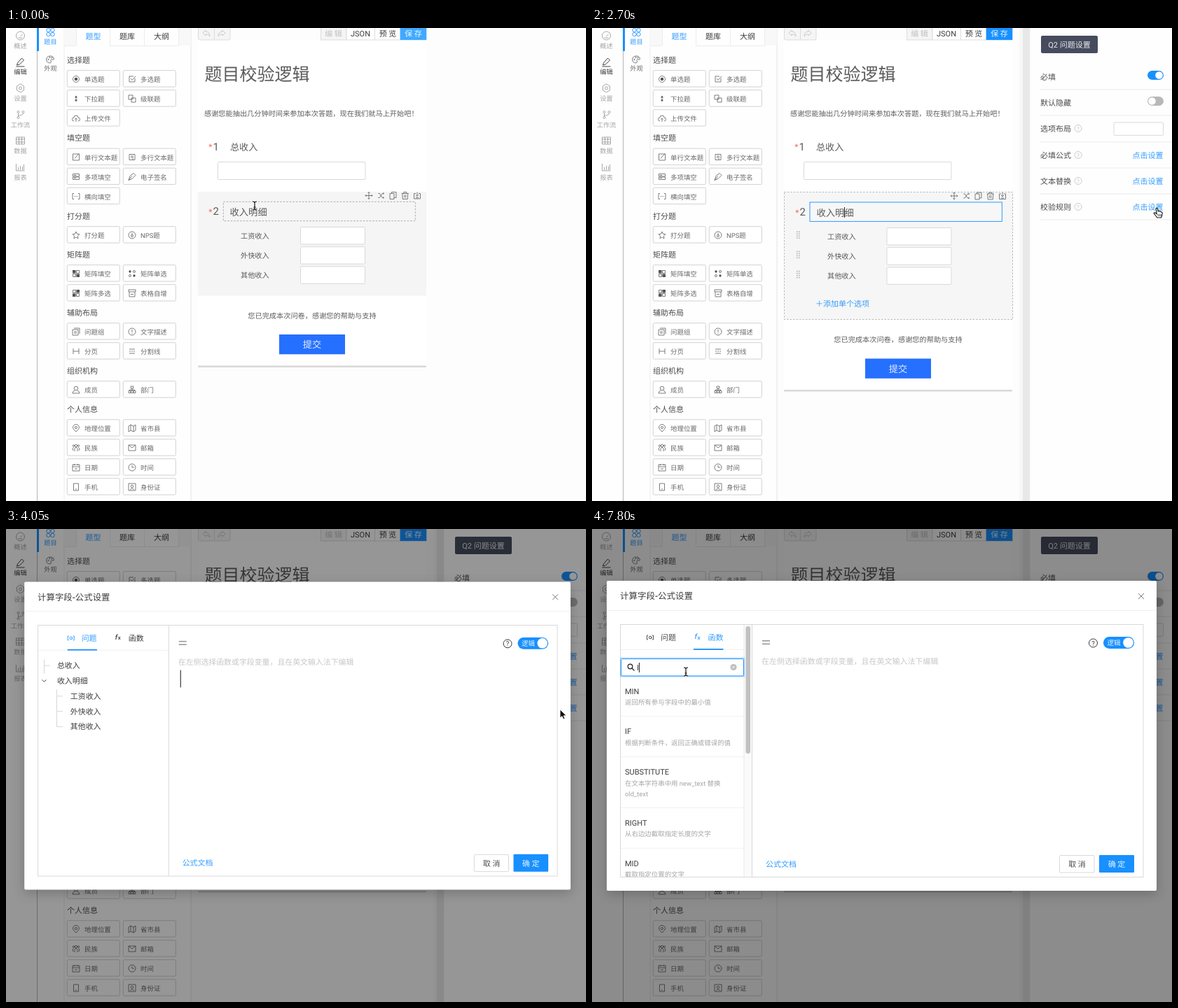
Write an HTML page that moves like this. It is 828 px wide and 676 px high and loops after 8 s.

```html
<!DOCTYPE html>
<html lang="zh-CN">
<head>
<meta charset="utf-8">
<title>题目校验逻辑</title>
<style>
html, body { margin: 0; width: 100%; height: 100%; overflow: hidden; background: #fff; }
svg { display: block; width: 828px; height: 676px; }
text { font-family: Roboto, "Noto Sans CJK SC", "Noto Sans CJK", sans-serif; white-space: pre; text-rendering: geometricPrecision; fill-opacity: .88; }
</style>
</head>
<body>
<svg id="stage" viewBox="0 0 828 676"></svg>
<script>
const LOOP = 8000, STEP = 150, BLUE = '#1890ff';

// Drawing helpers; text is placed by the vertical centre of its line.
const text = (s, x, y, size = 11, fill = '#333', anchor = 'start', extra = '') =>
  `<text x="${x}" y="${y + size * .38}" font-size="${size}" fill="${fill}" text-anchor="${anchor}" ${extra}>${s}</text>`;
const mid = (s, x, y, size, fill) => text(s, x, y, size, fill, 'middle');
const rect = (x, y, w, h, fill, stroke = 'none', extra = '') =>
  `<rect x="${x}" y="${y}" width="${w}" height="${h}" fill="${fill}" stroke="${stroke}" ${extra}/>`;
const path = (d, x = 0, y = 0, stroke = '#666', width = .85, fill = 'none') =>
  `<path d="${d}" transform="translate(${x} ${y})" stroke="${stroke}" stroke-width="${width}" fill="${fill}"/>`;
const circle = (x, y, r) => `M${x - r} ${y}a${r} ${r} 0 1 0 ${2 * r} 0a${r} ${r} 0 1 0 ${-2 * r} 0`;
const box = (x, y, w, h) => `M${x} ${y}h${w}v${h}h${-w}z`;
const hline = (x, y, w, color = '#ececec') => rect(x, y, w, 1, color);
const vline = (x, y, h, color = '#ececec') => rect(x, y, 1, h, color);
const toggle = (x, y, w, h, on) => {
  const r = h / 2;
  return rect(x, y, w, h, on ? BLUE : '#b8b8b8', 'none', `rx="${r}"`) +
    `<circle cx="${on ? x + w - r : x + r}" cy="${y + r}" r="${r - 1.2}" fill="#fff"/>`;
};
const help = (x, y, r, color) => path(circle(0, 0, r), x, y, color, .9) + mid('?', x, y, r * 1.6, color);

const NAV = [
  ['概述', 11, circle(0, 0, 6) + 'M0 1L3-2M-3 3H3'],
  ['编辑', 48, 'M-4 2L2-5 5-2-1 4-5 5zM-6 7H6'],
  ['设置', 86, circle(0, 0, 2) + 'M0-6L5-3V3L0 6-5 3V-3z'],
  ['工作流', 124, circle(-3, -4, 1.5) + circle(-3, 4, 1.5) + circle(4, -4, 1.5) + 'M-3-2V3M4-2Q4 1-3 1'],
  ['数据', 161, box(-6, -5, 12, 10) + 'M-6-2H6M-6 2H6M-2-5V5M2-5V5'],
  ['报表', 199, 'M-6-5V5H6M-3 4V0M0 4V-2M3 4V-1M5 4V-4'],
];

// Each item: label, outline, optional filled part.
const PALETTE = [
  ['选择题', 45, [
    ['单选题', circle(0, 0, 4.5), circle(0, 0, 2.3)],
    ['多选题', 'M4-1V4H-4V-4H2M-2-1L0 1.5 5-4'],
    ['下拉题', 'M0-3V3', 'M-2-1.5L0-4.5 2-1.5zM-2 1.5L0 4.5 2 1.5z'],
    ['级联题', box(-5, -5, 6, 6) + box(-1, -1, 6, 6)],
    ['上传文件', 'M-3 4A2.5 2.5 0 0 1-3-1A3 3 0 0 1 3-1A2.5 2.5 0 0 1 3 4M0 5V0M-1.5 1.5L0 0 1.5 1.5']]],
  ['填空题', 156.5, [
    ['单行文本题', box(-4.5, -4.5, 9, 9) + 'M-2 2L4-5'],
    ['多行文本题', box(-4, -4, 8, 8) + 'M-2-1.5H2M-2 .5H2M0 2.5H2'],
    ['多项填空', box(-4.5, -4, 9, 3.5) + box(-4.5, .5, 9, 3.5) + 'M-3-2H0M-3 2H0'],
    ['电子签名', 'M-5 5L-3-1 2-5 5-2 0 3zM-5 5L0-1'],
    ['横向填空', 'M-3-4H-5V4H-3M3-4H5V4H3M-2.5 0H-1.5M-.5 0H.5M1.5 0H2.5']]],
  ['打分题', 268, [
    ['打分题', 'M0-5L1.5-1.6 5-1.2 2.4 1.2 3 4.8 0 3-3 4.8-2.4 1.2-5-1.2-1.5-1.6z'],
    ['NPS题', circle(0, 0, 5) + circle(0, 1, 1.5) + 'M0-3V0']]],
  ['矩阵题', 323, [
    ['矩阵填空', box(.5, -4.5, 4, 4) + box(-4.5, .5, 4, 4), box(-5, -5, 4.5, 4.5) + box(.5, .5, 4.5, 4.5)],
    ['矩阵单选', circle(3, -3, 1.5) + circle(-3, 3, 1.5), circle(-3, -3, 1.7) + circle(3, 3, 1.7)],
    ['矩阵多选', box(-4.5, -4.5, 4, 4) + box(.5, .5, 4, 4), box(.5, -5, 4.5, 4.5) + box(-5, .5, 4.5, 4.5)],
    ['表格自增', box(-5, -5, 10, 3) + 'M-4-2V5H4V-2M-2 1.5H2']]],
  ['辅助布局', 406, [
    ['问题组', box(-5, -3, 8, 8) + 'M-3-5H5V3M-3 0H1M-3 2H1'],
    ['文字描述', circle(0, 0, 5) + 'M0-3V1M0 2V3'],
    ['分页', 'M-4-4V4M4-4V4M-4 0H4'],
    ['分割线', 'M-4-3H4M-4 0H-2M-1 0H1M2 0H4M-4 3H4']]],
  ['组织机构', 489, [
    ['成员', circle(0, -2, 2.8) + 'M-1.5 1Q-5 2-5 5H5Q5 2 1.5 1'],
    ['部门', box(-1.8, -5, 3.6, 3) + box(-5, 1.5, 3, 3) + box(-1.5, 1.5, 3, 3) + box(2, 1.5, 3, 3) + 'M0-2V1M-3.5 1.5V0H3.5V1.5']]],
  ['个人信息', 544, [
    ['地理位置', circle(0, -1, 1.6) + 'M0 5Q-4.5 1-4.5-1A4.5 4.5 0 0 1 4.5-1Q4.5 1 0 5z'],
    ['省市县', 'M-5-3L-2-5 2-3 5-5V3L2 5-2 3-5 5zM-2-5V3M2-3V5'],
    ['民族', circle(0, -3, 1.7) + circle(-3.5, -3, 1.2) + circle(3.5, -3, 1.2) + 'M-2 5V1L0-1 2 1V5M-3-1L-5 1-4 4M3-1L5 1 4 4'],
    ['邮箱', box(-5, -4, 10, 8) + 'M-5-4L0 0 5-4'],
    ['日期', box(-5, -4, 10, 9) + 'M-5-1H5M-2.5-5V-3M2.5-5V-3M-2 2H2'],
    ['时间', circle(0, 0, 5) + 'M0-3V0H3'],
    ['手机', box(-3.5, -5, 7, 10) + 'M-1 3H1'],
    ['身份证', box(-5, -5, 10, 10) + circle(0, -1, 1.8) + 'M-3 4Q0 0 3 4']]],
];

function sidebar() {
  let s = rect(0, 0, 264, 676, '#fefefe') + vline(44, 0, 676, '#b5b5b5') + vline(82.5, 0, 676) + vline(263.5, 0, 676, '#e4e4e4');
  for (const [label, y, icon] of NAV) {
    const color = label === '编辑' ? '#222' : '#999';
    s += path(icon, 20.5, y, color) + mid(label, 20.5, y + 14.5, 9.2, color);
  }
  s += rect(44, 0, 3, 33, BLUE);
  s += path([[-3, -3], [3, -3], [-3, 3], [3, 3]].map(([x, y]) => circle(x, y, 2.7)).join(''), 63.5, 6, BLUE) + mid('题目', 63.5, 20, 9.2, BLUE);
  s += path('M-1 5A5.5 5 0 1 1 5-1Q5 1 2 0Q-1 0 1 3Q1 5-1 5' + circle(-3, 0, .7) + circle(-1, -3, .7) + circle(2, -2.5, .7), 63.5, 45) + mid('外观', 63.5, 58, 9.2, '#555');
  s += rect(83, 0, 17, 25, '#f8f8f8') + rect(246, 0, 18, 25, '#f8f8f8');
  s += [100, 148, 197, 246].map(x => vline(x, 0, 25)).join('') + hline(83, 25, 17) + hline(148, 25, 99);
  s += mid('题型', 124.5, 11.5, 11, BLUE) + mid('题库', 173, 11.5, 11, '#222') + mid('大纲', 222, 11.5, 11, '#222');
  for (const [title, y, items] of PALETTE) {
    s += text(title, 87, y + .5, 11, '#333');
    items.forEach(([label, icon, solid = ''], i) => {
      const x = 87 + i % 2 * 80, cy = y + 27.5 + (i >> 1) * 28;
      s += rect(x + .3, cy - 11.8, 75, 23.4, '#fff', '#d2d2d2', 'rx="1.5"') + path(icon, x + 13, cy + .5) +
        path(solid, x + 13, cy + .5, 'none', 0, '#555') + text(label, x + 25, cy + 1.2, 9.45, '#555');
    });
  }
  return s;
}

function toolbar(selected) {
  const edge = '#dcdcdc';
  return rect(274.5, -5, 45.5, 22, '#f5f5f5', edge, 'rx="2"') + vline(297, 0, 17, edge) +
    path('M-5-1L-1-5V-3Q5-3 5 4Q3 0-1 1V3z', 286, 8, '#c4c4c4') + path('M5-1L1-5V-3Q-5-3-5 4Q-3 0 1 1V3z', 308, 8, '#c4c4c4') +
    rect(449.5, -5, 36.5, 22, '#f5f5f5', edge) + rect(486, -5, 77, 22, '#fff', edge) + vline(526, 0, 17, edge) +
    rect(562.7, -5, 37.6, 22.2, selected ? BLUE : '#40a9ff') +
    mid('编 辑', 467.5, 8, 11, '#bbb') + mid('JSON', 506, 8, 11, '#222') + mid('预 览', 545, 8, 11, '#222') + mid('保 存', 581.5, 8, 11, '#fff');
}

const numberLabel = (n, x, y) => text('*', x + .3, y + .5, 12, '#ff4d4f') + text(n, x + 6.5, y, 15, '#444');
const ACTIONS = [
  'M-5 0H5M0-5V5M-3.5-1.5L-5 0-3.5 1.5M3.5-1.5L5 0 3.5 1.5M-1.5-3.5L0-5 1.5-3.5M-1.5 3.5L0 5 1.5 3.5',
  'M-4-3H-2L2 3H4M-4 3H-2L2-3H4M3-4L4.5-3 3-2M3 2L4.5 3 3 4',
  box(-4.5, -3, 6, 8) + 'M-2-3V-5H4.5V3H1.5',
  'M-5-3H5M-2-3V-5H2V-3M-4-3L-3.5 5H3.5L4-3M-1-1V3M1-1V3',
  'M-2-3H-4.5V4.5H4.5V-3H2M0-5V1M-2-1L0 1 2-1M-2 3H2',
];

function form(selected, caret) {
  const o = selected ? 1 : 0, down = selected ? 34.5 : 0;
  let s = rect(264, 0, 564, 676, '#fdfdfd') + rect(274, 17, 326, 467 + down, '#fff') + toolbar(selected);
  s += text('题目校验逻辑', 283.5, 65.5, 25, '#444', 'start', 'font-weight="300"');
  s += text('感谢您能抽出几分钟时间来参加本次答题，现在我们就马上开始吧！', 283, 122, 10.2, '#444');
  s += numberLabel(1, 289, 169) + text('总收入', 320, 170, 13.1, '#444') + rect(302.5, 191.5, 210.5, 25, '#fff', '#d9d9d9', 'rx="1"');
  s += selected
    ? rect(274.5, 234.5, 326, 182, '#f6f6f6', '#b8b8b8', 'stroke-dasharray="2.5 2"') + rect(311, 249, 274.3, 27.4, '#f7f7f7', BLUE, 'stroke-width=".9"')
    : rect(274, 234, 326, 148.5, '#f5f5f5') + rect(310.3, 248.3, 274, 27.4, 'none', '#aaa', 'stroke-dasharray="2.5 2"');
  ACTIONS.forEach((d, i) => s += path(d, 518 - o + i * 17.25, 239.5 + o / 2));
  s += numberLabel(2, 289 + o, 261.5 + o) + text('收入明细', 319.5 + o, 262.5 + o, 13.3, '#444');
  if (caret) s += vline(360, 256, 15, '#222');
  ['工资收入', '外快收入', '其他收入'].forEach((label, i) => {
    const y = 297 + o + i * 28.2;
    s += text(label, 335 + o, y + .2, 10.2, '#444') + rect(420.5 + o / 2, y - 12.5, 92, 24.5, '#fff', '#d9d9d9', 'rx="1"');
    if (selected) for (let k = 0; k < 8; k++) s += rect(292 + k % 2 * 3, y - 7.5 + (k >> 1) * 3, 1.5, 1.5, '#aaa');
  });
  if (selected) s += text('＋添加单个选项', 319, 394, 11, BLUE);
  s += mid('您已完成本次问卷，感谢您的帮助与支持', 437, 411 + down, 10.2, '#444');
  s += rect(390, 438 + down, 94, 28.3, '#2670ff') + mid('提交', 437, 452.3 + down, 13.2, '#fff');
  return s + rect(274, 482.5 + down, 326, 2.5, '#d8d8d8', 'none', 'rx="1"');
}

function settings(shift) {
  let s = rect(610, 0, 5, 676, '#f7f7f7') + rect(615, 0, 10.5, 676, '#e8e8e8') + rect(625.5, 0, 203, 676, '#fefefe');
  s += rect(641, 11, 81, 25, '#464c5e', 'none', 'rx="2"') + mid('Q2 问题设置', 681.5, 23.5, 11, '#fff');
  s += [88, 125, 163, 200, 237, 274].map(y => hline(640, y - .5, 188)).join('');
  ['必填', '默认隐藏', '选项布局', '必填公式', '文本替换', '校验规则'].forEach((label, i) => {
    const y = [70, 106.5, 144, 182, 219, 256][i];
    s += text(label, 640, y, 11, '#333');
    if (i > 1) s += help(694, y - .5, 5, '#c4c4c4');
    if (i > 2) s += text('点击设置', 771.5, y, 11, BLUE);
  });
  s += toggle(793, 61, 23, 13, true) + toggle(793, 98, 23, 13, false) + rect(745, 135, 70.5, 18.3, '#fff', '#d9d9d9', 'rx="1"');
  return `<g transform="translate(${shift} 0)">${s}</g>`;
}

function tree() {
  const gray = '#d6d6d6';
  return path('M49.5 186V206M49.5 194.5H58M67.5 229V282.5H76M67.5 238.5H76M67.5 260.5H76', 0, 0, gray, 1) +
    path('M-3-1.5L0 1.5 3-1.5', 49.5, 216.5, '#444', 1) +
    text('总收入', 68, 194.5, 11, '#222') + text('收入明细', 68, 216.5, 11, '#222') +
    ['工资收入', '外快收入', '其他收入'].map((s, i) => text(s, 87, 238.3 + i * 21.9, 11, '#222')).join('');
}

const COMMON = [['SUM', '返回所有参与字段中数值的总和'], ['MAX', '返回所有参与字段中的最大值'], ['MIN', '返回所有参与字段中的最小值'],
  ['AVERAGE', '计算所有参与运算字段的平均值'], ['ROUND', '将数字四舍五入到指定的位数'], ['CONCATENATE', '']];
const MATCHES = [['MIN', '返回所有参与字段中的最小值'], ['IF', '根据判断条件，返回正确或错误的值'],
  ['SUBSTITUTE', '在文本字符串中用 new_text 替换', 'old_text'], ['RIGHT', '从右边边截取指定长度的文字'], ['MID', '截取指定位置的文字']];

function functions(t) {
  const typed = t >= 7800, focus = t >= 7050 ? 1 : t >= 6900 ? .5 : 0, caret = t >= 6900 && t < 7350;
  let s = rect(217, 137, 11, 360, '#fafafa') + vline(216.5, 137, 360, '#e8e8e8') + rect(219.5, 139, 6.5, typed ? 182 : 239, '#c1c1c1', 'none', 'rx="3.2"');
  if (focus) s += rect(40.5, 184.5, 176.5, 26, 'none', BLUE, `stroke-width="3" opacity="${.2 * focus}"`);
  s += rect(41.5, 185.5, 175, 24.5, '#fff', focus ? BLUE : '#d9d9d9', 'rx="1"') + path(circle(-1, -1, 3.3) + 'M1.5 1.5L5 5', 55.5, 197.5, '#222', 1.2);
  if (!typed) {
    if (caret) s += vline(64, 191, 14, '#222');
    s += text('搜索公式', 64, 198, 11, '#bfbfbf') + text('常用', 54, 228.5, 11, '#222') + path('M-4-2L0 2 4-2', 199, 228.5, '#333', 1.1);
    COMMON.forEach(([name, note], i) => {
      const y = 268 + i * 44.6;
      s += text(name, 59, y, 11, '#222') + text(note, 59, y + 15.5, 9.45, '#999');
    });
    return s;
  }
  s += text('I', 64, 197.5, 11, '#222') + vline(67, 191, 14, '#222') + path(circle(0, 0, 4.6), 202, 197.5, 'none', 0, '#bfbfbf') + path('M-1.6-1.6L1.6 1.6M1.6-1.6L-1.6 1.6', 202, 197.5, '#fff');
  let y = 231.5;
  for (const [name, ...notes] of MATCHES) {
    s += text(name, 47, y, 11, '#222');
    notes.forEach((note, i) => s += text(note, 47, y + 16 + i * 15, 9.45, '#999'));
    y += 42.8 + notes.length * 15;
    s += hline(41, y - 22, 176, '#f0f0f0');
  }
  return s;
}

function modal(t) {
  const showFunctions = t >= 6300, dx = showFunctions ? 0 : 5;
  const ink = t < 6300 ? 83 : t < 6450 ? 109 : 145;
  const first = t < 6300 ? BLUE : t < 6450 ? '#1d5a94' : '#333', second = t >= 6150 ? BLUE : '#222';
  let s = rect(21, 74, 785, 443, '#fff', 'none', 'rx="2" style="filter:drop-shadow(0 5px 8px #0003)"');
  s += text('计算字段-公式设置', 40, 95.5, 12.5, '#222', 'start', 'font-weight="500"') + path('M-4-4L4 4M4-4L-4 4', 784, 96, '#777', 1) + hline(21, 116, 785, '#f0f0f0');
  s += rect(40.5, 136.5, 746.5, 361, '#fff', '#d9d9d9') + hline(41, 172, showFunctions ? 176 : 187, '#f0f0f0');
  s += path('M-3-3H-4.5V3H-3M3-3H4.5V3H3' + circle(0, 0, 1.8) + 'M1.8-1V1.5', 83 + dx, 155, first) + text('问题', 98 + dx, 154.5, 11, first);
  s += text('f', 146.5 + dx, 153.5, 10, second, 'start', 'font-style="italic" font-weight="500"') + text('x', 150.5 + dx, 154.5, 8, second, 'start', 'font-weight="500"') + text('函数', 165.5 + dx, 154.5, 11, second);
  s += rect(ink, 171, 42.5, 1.8, BLUE);
  s += `<g clip-path="url(#list)">${showFunctions ? functions(t) : tree()}</g>` + vline(228, 137, 360, '#d9d9d9');
  s += rect(243, 159, 11, 1.6, '#999') + rect(243, 163.5, 11, 1.6, '#999');
  s += help(715.5, 163, 6, '#222') + toggle(730, 154, 44, 17, true) + text('逻辑', 735.5, 162.8, 9.6, '#fff');
  s += text('在左侧选择函数或字段变量，且在英文输入法下编辑', 242, 189, 10.97, '#bfbfbf');
  if (t < 4500) s += vline(245, 201, 25, '#111');
  s += text('公式文档', 248, 478.5, 11, BLUE);
  s += rect(667.5, 466.5, 49.5, 24.5, '#fff', '#d9d9d9', 'rx="1"') + mid('取 消', 692.5, 478.7, 11, '#333');
  s += rect(724, 466, 50, 25, BLUE, 'none', 'rx="1"') + mid('确 定', 749, 478.7, 11, '#fff');
  const opening = t < 4200 ? 'transform="translate(800 290) scale(.9933) translate(-800 -290)"' : '';
  return `<g ${opening}>${s}</g>`;
}

// Pointer hot spot over time: [ms, x, y]
const ROUTE = [[0, 355, 254], [300, 360, 257], [1500, 360, 257], [1650, 389, 259], [2550, 766, 256], [2700, 806, 257], [2850, 791, 258],
  [4650, 791, 258], [5400, 112, 182], [5700, 80, 172], [6150, 169, 163], [6300, 169, 163], [6750, 134, 204], [LOOP, 134, 204]];

function pointer(t) {
  const i = ROUTE.findIndex(k => k[0] > t), [t0, x0, y0] = ROUTE[i - 1], [t1, x1, y1] = ROUTE[i];
  const k = (t - t0) / (t1 - t0), e = k * k * (3 - 2 * k), x = x0 + (x1 - x0) * e, y = y0 + (y1 - y0) * e;
  if ((t < 2700 && x < 586) || t >= 6600) {
    const beam = 'M-3-6Q0-6 0-4V4Q0 6-3 6M3-6Q0-6 0-4M0 4Q0 6 3 6M-1.5 2H1.5';
    return path(beam, x, y, '#fff', 2.4) + path(beam, x, y, '#111', 1.2);
  }
  if ((t >= 2700 && t < 3900) || (t >= 6000 && t < 6600))
    return path('M-1 1Q0-.8 1.2 1L2.2 5Q3.5 4 4.3 5.3Q5.8 4.5 6.4 6Q8 5.6 8.2 7.5L7.6 11 6.6 14H.8L-1.5 11-4 7.6Q-3.4 6-1.6 7.2L.2 8.6z', x, y, '#111', 1.1, '#fff') +
      path('M2.2 9V12M4.2 9V12M6 9V12', x, y, '#111', .7);
  return path('M0 0V12L2.8 9.6 4.8 13.8 6.8 13 5 8.8H9z', x, y, '#fff', .8, '#111');
}

function scene(t) {
  const selected = t >= 600;
  const caret = t >= 1050 && t < 3150 && !(t >= 2100 && t < 2550);
  const panelShift = t < 900 ? 120 : t < 1050 ? 30 : 0;
  let s = '<clipPath id="list"><path d="M40 137H228V497H40z"/></clipPath>';
  s += form(selected, caret) + sidebar();
  if (t >= 750) s += settings(panelShift);
  if (t >= 3900) s += rect(0, 0, 828, 676, '#000', 'none', `opacity="${t < 4050 ? .095 : t < 4200 ? .41 : .45}"`);
  if (t >= 4050) s += modal(t);
  return s + pointer(t);
}

const stage = document.getElementById('stage');
let shown = -1;
function tick() {
  const t = Math.min(Math.floor(performance.now() % LOOP / STEP) * STEP, 7800);
  if (t !== shown) stage.innerHTML = scene(shown = t);
  requestAnimationFrame(tick);
}
tick();
</script>
</body>
</html>
```
